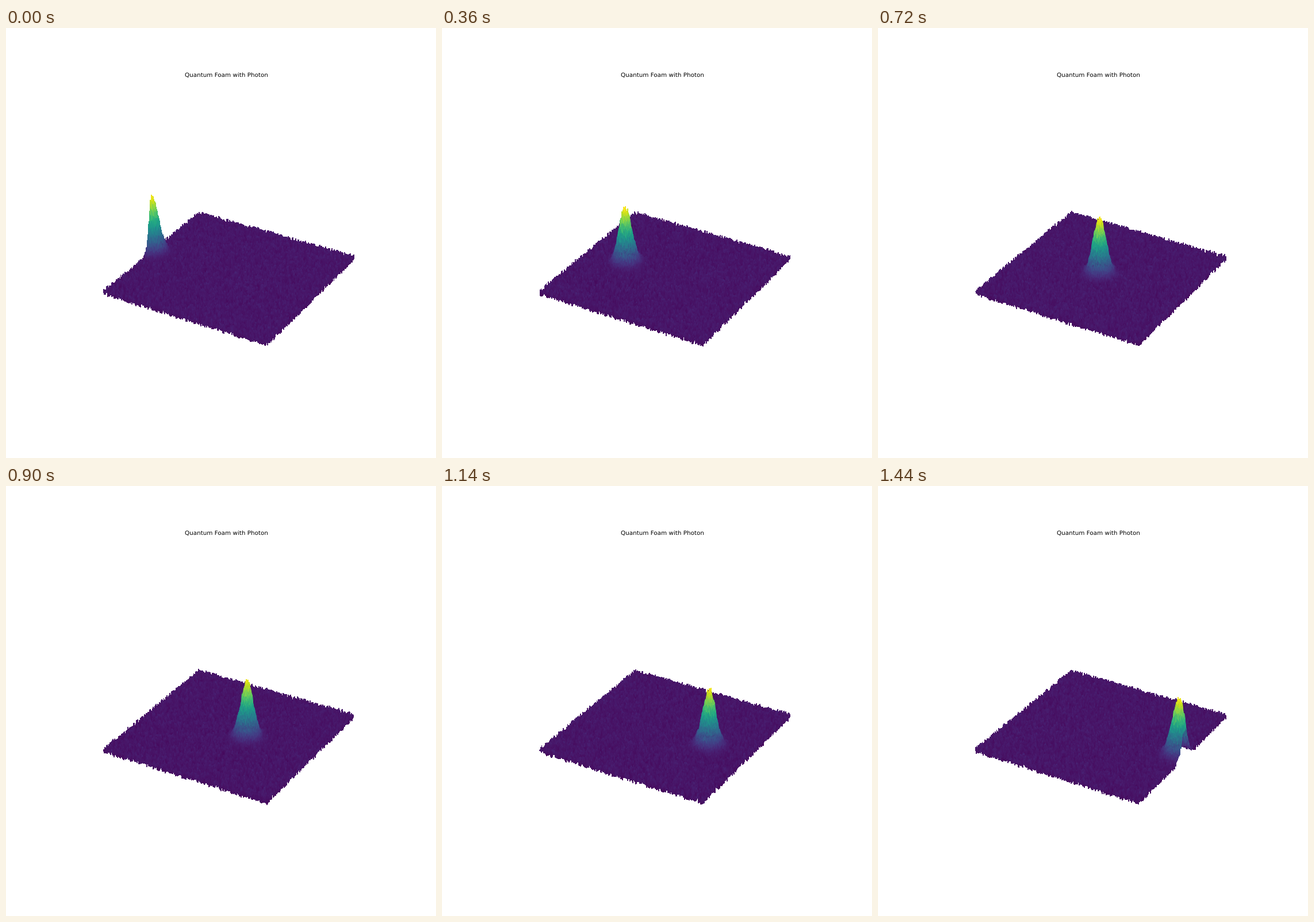
Animation of 748x748 px, one loop 1500 ms. Source, as a matplotlib script:

```python
import numpy as np
import matplotlib.pyplot as plt
from matplotlib.animation import FuncAnimation

SIZE = 748
FRAMES = 25
INTERVAL = 60
GRID = 200

# Surface extents in world units and the height range of the box
HALF = 0.5195
BOX_HEIGHT = 0.8929
Z_MIN, Z_MAX = -0.5, 1.5

# Camera and its mapping to pixels
ELEV, AZIM = np.radians(30), np.radians(-60)
DISTANCE = 10
ZOOM = 3113.3
ORIGIN_X, ORIGIN_Y = 391.1, 370.0

FOAM = 0.05
PEAK = 0.8
WIDTH = 0.1

# Rows and columns run from the far corner to the near one,
# so cells drawn in order cover those behind them.
axis = np.linspace(-1, 1, GRID)
X, Y = np.meshgrid(axis, axis[::-1])


def project(x, y, z):
    """Perspective view: pixel position of data points."""
    wx, wy = x * HALF, y * HALF
    wz = ((z - Z_MIN) / (Z_MAX - Z_MIN) - 0.5) * BOX_HEIGHT
    across = -np.sin(AZIM) * wx + np.cos(AZIM) * wy
    toward = np.cos(AZIM) * wx + np.sin(AZIM) * wy
    up = np.cos(ELEV) * wz - np.sin(ELEV) * toward
    depth = DISTANCE - np.cos(ELEV) * toward - np.sin(ELEV) * wz
    return ORIGIN_X + ZOOM * across / depth, ORIGIN_Y - ZOOM * up / depth


def cell_means(a):
    return (a[:-1, :-1] + a[:-1, 1:] + a[1:, 1:] + a[1:, :-1]) / 4


def height(frame):
    foam = np.random.default_rng(frame).uniform(-FOAM, FOAM, X.shape)
    center = -1 + 2 * frame / FRAMES
    return foam + PEAK * np.exp(-((X - center) ** 2 + Y ** 2) / WIDTH ** 2)


plt.rcParams["text.hinting"] = "none"
fig = plt.figure(figsize=(12, 12), dpi=SIZE / 12, facecolor="white")
ax = fig.add_axes([0, 0, 1, 1])
ax.set_xlim(0, SIZE)
ax.set_ylim(SIZE, 0)
ax.axis("off")
fig.text(0.5125, 0.88 + 6 / (12 * 72), "Quantum Foam with Photon",
         ha="center", va="baseline", fontsize=12, family="DejaVu Sans")


def update(frame):
    for mesh in list(ax.collections):
        mesh.remove()
    z = height(frame)
    px, py = project(X, Y, z)
    level = cell_means(z)
    # A solid pass closes the seams, a smooth one softens the outline
    return [ax.pcolormesh(px, py, level, cmap="viridis", shading="flat",
                          linewidth=0, antialiased=smooth)
            for smooth in (False, True)]


anim = FuncAnimation(fig, update, frames=FRAMES, interval=INTERVAL,
                     init_func=lambda: update(0), repeat=True, repeat_delay=0)
plt.show()
```
